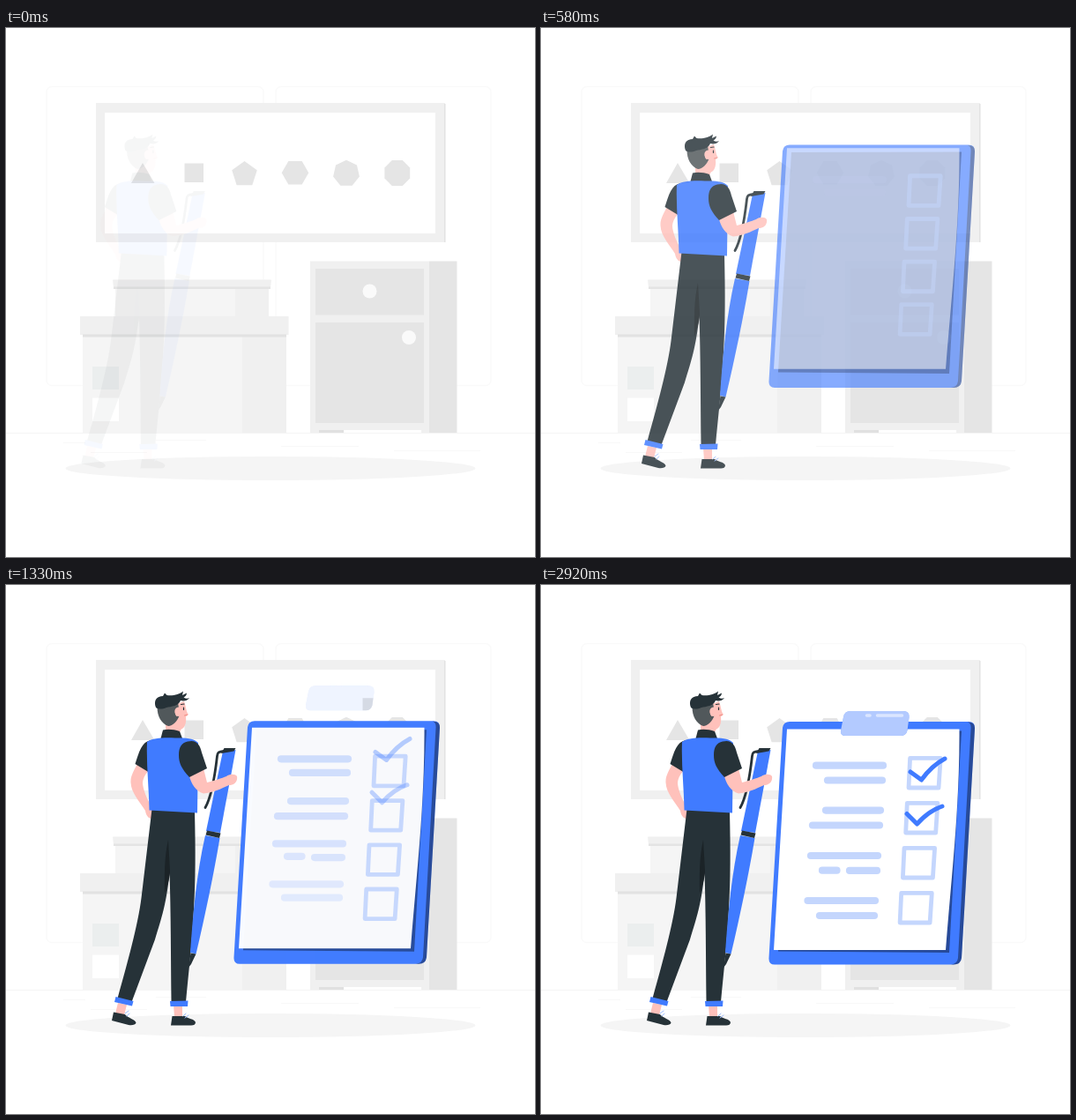
Write an HTML page that moves like this. It is 600x600 px and loops after 3210 ms.

```html
<!DOCTYPE html>
<html lang="en">
<head>
<meta charset="utf-8">
<title>Checklist</title>
<style>
  html, body { margin: 0; width: 100%; height: 100%; overflow: hidden; background: #fff; }
  svg { display: block; width: 100vw; height: 100vh; }
  .ink { fill: #263238; }
  .blue { fill: #407bff; }
  .skin { fill: #ffc1bb; }
  .line { fill: none; stroke-linecap: round; stroke-linejoin: round; }
</style>
</head>
<body>
<svg id="stage" viewBox="0 0 600 600">
  <!-- room -->
  <g fill="none" stroke="#fafafa" stroke-width="1.5">
    <rect x="46" y="66.500" width="246" height="339" rx="6"/>
    <rect x="306" y="66.500" width="244" height="339" rx="6"/>
  </g>
  <rect x="102" y="85" width="396" height="158" fill="#f0f0f0"/>
  <rect x="497" y="86" width="1.500" height="157" fill="#e2e2e2"/>
  <rect x="112" y="96" width="375" height="137" fill="#fff"/>
  <g id="shapes" fill="#e5e5e5">
    <path d="M142 176L155 153L168.500 176Z"/>
    <rect x="202.500" y="153.500" width="21.500" height="21.500"/>
  </g>

  <!-- boxes -->
  <path d="M124 295H298V327H124Z" fill="#f5f5f5"/>
  <path d="M260 295H298V327H260Z" fill="#f0f0f0"/>
  <path d="M121 285.500H301L300 294H122Z" fill="#f0f0f0"/>
  <path d="M122 293.500H300V296H122Z" fill="#e4e4e4"/>
  <path d="M87 348H318V459H87Z" fill="#f5f5f5"/>
  <path d="M268 348H318V459H268Z" fill="#f0f0f0"/>
  <path d="M84 327H320.500V348H84Z" fill="#f0f0f0"/>
  <path d="M87 347.500H318V350.500H87Z" fill="#e2e2e2"/>
  <rect x="98" y="384" width="30" height="26" fill="#ebeeee"/>
  <rect x="98" y="419.500" width="30" height="26.500" fill="#fff"/>

  <!-- cabinet -->
  <rect x="345" y="264.500" width="135" height="194.500" fill="#f0f0f0"/>
  <rect x="480" y="264.500" width="31.500" height="194.500" fill="#e5e5e5"/>
  <g fill="#e5e5e5">
    <rect x="351" y="273" width="123" height="52.500"/>
    <rect x="351" y="334" width="123" height="114"/>
  </g>
  <rect x="355" y="456" width="28" height="3" fill="#e0e0e0"/>
  <rect x="383" y="456" width="88" height="3" fill="#fff"/>
  <g fill="#fafafa">
    <circle cx="412.500" cy="298.500" r="8"/>
    <circle cx="457" cy="351" r="8"/>
  </g>

  <!-- floor -->
  <path d="M0 459.500H600" stroke="#f4f4f4"/>
  <path d="M65 470.500H90M170 467.500H227M312 474.500H400M440 479.500H538M96 481.500H160" stroke="#f8f8f8"/>
  <ellipse cx="300" cy="499.500" rx="232.500" ry="13.500" fill="#f5f5f5"/>

  <g id="man">
    <!-- far arm -->
    <path class="skin" d="M150 201C146 209 141 216 141.500 224C142 236 152 246 158 256C159 262 162 266 168 265L166 252C160 244 155 231 155 224C156 217 159 214 162 210Z"/>
    <path class="ink" d="M164 176C154 178 151 189 146.500 203L163 213L167 190Z"/>
    <!-- feet -->
    <path class="skin" d="M127 474L137 476L134 488L124 486ZM190 476L200 476L200 490L191 490Z"/>
    <path class="ink" d="M122 484.500L135 487C138 491 147 493 147.500 496.500C147 499 143 499.500 139 499L120 494Z"/>
    <path class="ink" d="M188.500 489H203C206 492 214 492 215 496C215 498.500 213 499.500 210 499.500H187Z"/>
    <path class="line" d="M135 486L139 483M137 489L140 486M201 489L204 486M203 491L207 488" stroke="#9dbcff"/>
    <!-- legs -->
    <path class="ink" d="M165.500 254L214 257C215 300 215 335 213 368C211 408 207 440 204 473L187.500 472C187 425 187 370 185.500 326C182 362 176 379 169 402L142.500 473L126.500 469C138 428 150 384 153.500 355Z"/>
    <path d="M184 289C179 311 180 332 180 350C184 338 186 331 186 324Z" fill="#1b2327"/>
    <path class="blue" d="M124.500 467L144.500 472L143 477.500L123 473ZM186 472L206.500 471.500L206 478H186.500Z"/>
    <!-- neck and vest -->
    <path class="skin" d="M181 154L201 159L197 167L181 168Z"/>
    <path class="ink" d="M175.500 174L178 164.500C184 163 191 164 197 166L200 174Z"/>
    <path class="blue" d="M160 178C167 173 180 173 192 173.500C205 173 214 174 218 179L217 258.500L162.500 255.500C162 228 159 203 160 178Z"/>
    <!-- head -->
    <path class="skin" d="M189 137L202 132C204 137 204 142 206.500 147L204 149.500C205 158 202 164 196 164C188 164 184 156 184 149Z"/>
    <path d="M171.500 138L195 134L196 139C191 141 191 146 193.500 149L197 147C195 154 189 160 184 160C176 157 171.500 149 171.500 138Z" fill="#51585b"/>
    <path class="skin" d="M198 139C193 137 190 142 192 146C193 149 196 150 198 148Z"/>
    <path class="ink" d="M170 139C167 131 171 126 178 126L180 122.500L182.500 125C189 126 197 124 201 120.500L200 125L205 122.500C205 125 203 127 201.500 127.500C204 129 206 129 208 128C206 131.500 201 132 198 131C196 137 187 138 182 139C177 141 173 141 170 139Z"/>
    <path class="line" d="M198.500 135.500L202 135M201.500 139V141.500" stroke="#263238" stroke-width="1.200"/>
    <path class="line" d="M202.500 148L206 147" stroke="#f08b84"/>
    <!-- pen -->
    <path class="blue" d="M246 188.500L260.500 187L243 281L227 279Z"/>
    <path class="blue" d="M226 284L242.500 287C236 326 226 374 215.500 418.500L209 417C212 373 216 328 226 284Z"/>
    <path class="ink" d="M228 278.500L243.500 281.500L242 287L226.500 283.500ZM247.500 185H260.500L258.500 188.500L244 191ZM209.500 417.500L215.500 418.500L210 430L207 434Z"/>
    <path class="line" d="M247 188.500C241 189 240 190 239.500 194C237 216 232 242 226 252.500" stroke="#263238" stroke-width="2.800"/>
    <!-- near arm -->
    <path class="skin" d="M210 211L224 208L228 224C236 222 245 219 250 217C254 214 260 214 262 217C263 223 259 227 253 227C244 231 234 236 224 236.500C215 234 210 225 208 217Z"/>
    <path class="ink" d="M206 177.500C216 175 220 181 222 190L228 208L208 218C199 208 196 202 196 193C196 184 199 179 206 177.500Z"/>
  </g>

  <!-- clipboard -->
  <g id="board">
    <path class="blue" d="M282 155H485Q492.500 155 492 163L477 423Q476 430.500 468 430.500H265Q258 430.500 258.500 423L274 162Q275 155 282 155Z"/>
    <path d="M484 155.500Q488 156.500 487.500 163L473 423Q472 430 465 430.500H468Q476 430.500 477 423L492 163Q492.500 155 484 155.500Z" fill="#000" opacity=".4"/>
  </g>
  <path id="shade" d="M284 166L477 165.500L463 417L269 415.500Z" fill="#000"/>
  <path id="paper" d="M279 163.500H474.500C475 250 466 325 459 414H264Z" fill="#fff"/>
  <g id="rows" class="line" stroke="#c4d6fd"></g>
  <g id="ticks" class="line" stroke="#407bff" stroke-width="5">
    <path d="M419 212L431.500 221Q443 205 458 197"/>
    <path d="M415 259.500L426.500 271Q440 256 455 251"/>
  </g>
  <g id="clip">
    <path class="blue" d="M351 143H411Q418 143 417.500 150L415.500 165Q414 171 408 171H345Q339.500 171 340 165L343 150Q344 143 351 143Z"/>
    <path d="M351 143H411Q418 143 417.500 150L415.500 165Q414 171 408 171H345Q339.500 171 340 165L343 150Q344 143 351 143Z" fill="#fff" opacity=".6"/>
  </g>
  <path id="corner" d="M404.500 157H416.500L415.500 165Q414 171 408 171H404.500Z"/>
  <path id="gloss" class="line" d="M369.500 148H373M381.500 148H409.500" stroke="#dbe6ff" stroke-width="3.600"/>
</svg>
<script>
const LOOP = 3210, STEP = 1000 / 24;
const $ = id => document.getElementById(id);

function add(parent, d, width) {
  const path = document.createElementNS(parent.namespaceURI, "path");
  path.setAttribute("d", d);
  if (width) path.setAttribute("stroke-width", width);
  return parent.appendChild(path);
}

// sides, centre x, centre y, radius, turn in radians
[[5, 270.5, 166, 15, -Math.PI / 2],
 [6, 328, 164.300, 15.300, 0],
 [7, 386, 165, 15.300, -Math.PI / 2],
 [8, 443.800, 164.500, 15.600, Math.PI / 8]].forEach(([n, x, y, r, turn]) => {
  const points = Array.from({ length: n }, (_, i) => {
    const a = turn + i * 2 * Math.PI / n;
    return [x + r * Math.cos(a), y + r * Math.sin(a)];
  });
  add($("shapes"), "M" + points.join("L") + "Z");
});

const parts = [];
const drop = (el, start, dist, strength = 1) =>
  parts.push({ el, start, dy: -dist, dx: 0, span: 1500, strength });

parts.push({ el: $("man"), start: -20, dx: -36, dy: 0, span: 1020, strength: 1 });
drop($("board"), 0, 60);
drop($("shade"), 50, 60, 0.4);
drop($("paper"), 95, 60);

// left, right, y, start
[[312, 388, 204.7, 510],
 [325, 387, 221.5, 565],
 [323, 385, 255.600, 645],
 [308, 384, 272.5, 635],
 [306, 382, 307, 755],
 [319, 335.5, 323.700, 830],
 [350, 381, 323.900, 795],
 [302.5, 379, 358, 915],
 [316, 378, 375, 960]].forEach(([x1, x2, y, start]) =>
  drop(add($("rows"), `M${x1} ${y}H${x2}`, 8.2), start, 36));

for (let i = 0; i < 4; i++) {
  const x = 418.6 - i * 3.3, y = 196.4 + i * 51;
  drop(add($("rows"), `M${x} ${y}h34.600l-2.200 33.600h-34Z`, 4.8), 120 + i * 40, 60);
}

[...$("ticks").children].forEach((el, i) => drop(el, 1020 + i * 45, 36));
drop($("clip"), 1175, 36);
drop($("corner"), 1175, 36);
drop($("gloss"), 1290, 36);

function draw(time) {
  let n = Math.floor((time + 5) / STEP);
  const done = n >= 70;
  n = Math.min(n, 63);
  for (const { el, start, dx, dy, span, strength } of parts) {
    const x = done ? 1 : Math.max(0, Math.min(1, (n * STEP - start) / span));
    const rest = (1 - x) ** 2;
    const alpha = el.id === "corner" ? 0.65 * rest * (1 - rest) : strength * (1 - rest);
    el.setAttribute("transform", `translate(${dx * rest} ${dy * rest})`);
    el.setAttribute("opacity", alpha);
  }
}

const begin = performance.now();
function tick() {
  draw((performance.now() - begin) % LOOP);
  requestAnimationFrame(tick);
}
tick();
</script>
</body>
</html>
```
